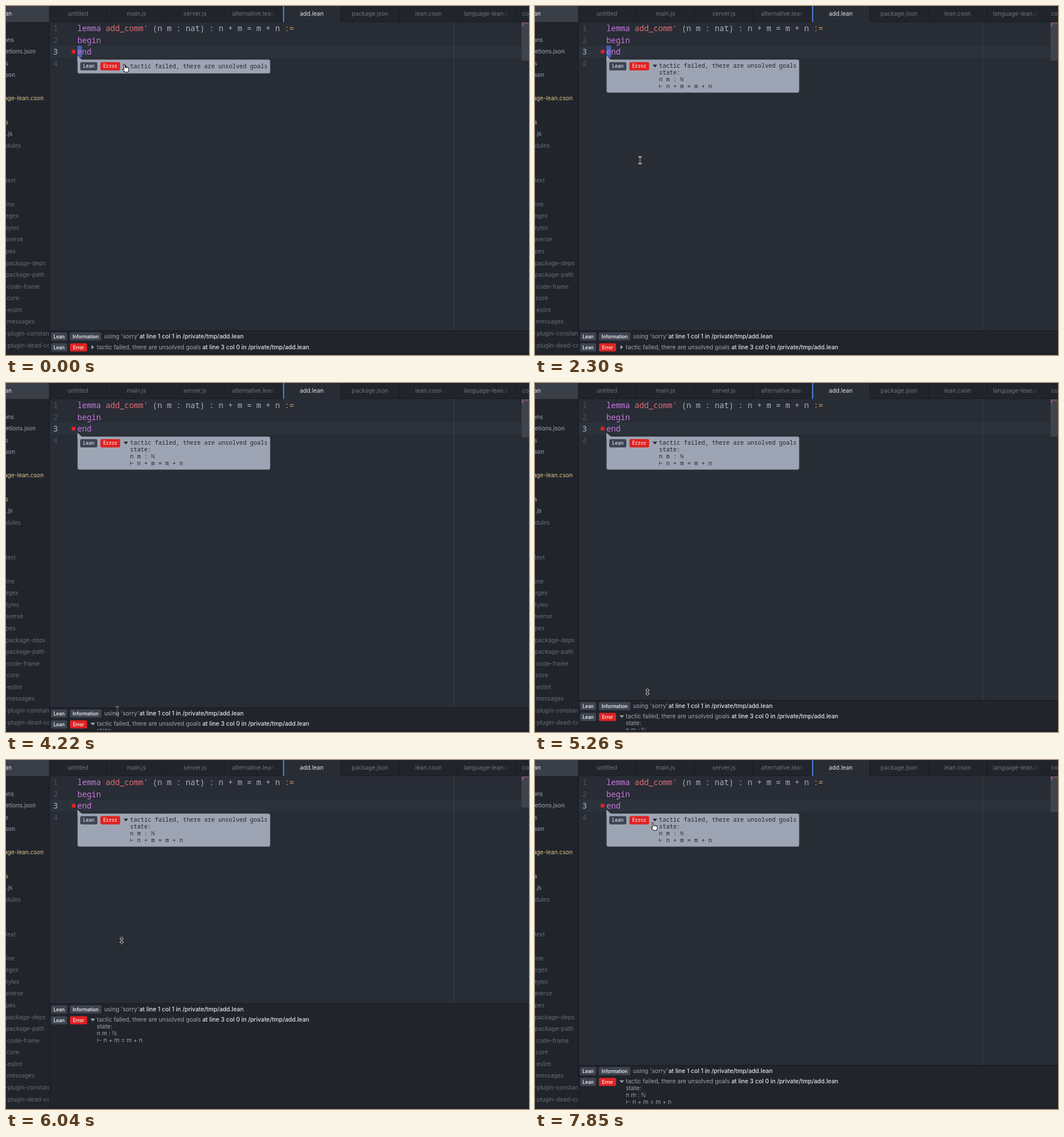
An HTML page that plays this animation: 916x611 px, repeating every 8000 ms.

```html
<!DOCTYPE html>
<html lang="en">
<head>
<meta charset="utf-8">
<title>Editor error messages</title>
<style>
  html, body { margin: 0; width: 100%; height: 100%; overflow: hidden; background: #282c34; }
  svg { display: block; width: 100%; height: 100%; }
  text { font: 10.2px Inter, "DejaVu Sans", sans-serif; fill: #9da5b4; white-space: pre; }
  .msg { font-size: 10.3px; }
  .place { font-size: 10.3px; font-weight: 500; fill: #e3e6eb; }
  .code { font: 500 13.75px "Noto Sans Mono", "DejaVu Sans Mono", monospace; fill: #abb2bf; }
  .tip { font: 10.3px "Noto Sans Mono", "DejaVu Sans Mono", monospace; fill: #21252b; }
  .badge { font-size: 8.3px; font-weight: 500; fill: #fff; text-anchor: middle; }
  .monoBadge { font: 500 8.3px "Noto Sans Mono", "DejaVu Sans Mono", monospace; fill: #fff; text-anchor: middle; }
  .mid { text-anchor: middle; }
  .end { text-anchor: end; }
  .tab { fill: #6d7480; }
  .ignored { fill: #666d79; }
  .modified { fill: #e2c08d; }
  .white { fill: #e3e6eb; }
  .key { fill: #c678dd; }
  .name { fill: #e06c75; }
  .op { fill: #d19a66; }
  .lineNo { fill: #495162; font-weight: 400; }
</style>
</head>
<body>
<svg id="stage" viewBox="0 0 916 611" preserveAspectRatio="none"></svg>
<script>
const BORDER = '#181a1f', SIDE = '#21252b', RED = '#e02222', GREY = '#3e4451';

const rect = (x, y, w, h, fill, extra = '') =>
  `<rect x="${x}" y="${y}" width="${w}" height="${h}" fill="${fill}" ${extra}/>`;
const text = (x, y, str, cls = '') => `<text x="${x}" y="${y}" class="${cls}">${str}</text>`;
const badge = (x, y, w, label, fill, cls = 'badge') =>
  rect(x, y, w, 14.4, fill, 'rx="2.5"') + text(x + w / 2, y + 10.1, label, cls);
const lines = (x, y, rows, cls) => rows.map((s, i) => text(x, y + i * 12, s, cls)).join('');
const arrowRight = (x, y, fill) => `<path d="M${x - 2} ${y - 3.7}l4.5 3.7l-4.5 3.7z" fill="${fill}"/>`;
const arrowDown = (x, y, fill) => `<path d="M${x - 4} ${y - 2.2}h8l-4 4.6z" fill="${fill}"/>`;

const TITLE = 'tactic failed, there are unsolved goals';
const GOALS = [TITLE, 'state:', 'n m : ℕ', '⊢ n + m = m + n'];

function sidebar() {
  // [row, right edge, label, class]
  const files = [
    [0, 14, 'ons'], [1, 52, 'etions.json'], [2, 4, 's'], [3, 16, 'son'],
    [5, 66, 'age-lean.cson', 'modified'], [7, 4, 's', 'modified'], [8, 11.5, '.js'],
    [9, 26, 'dules', 'ignored'], [12, 17, 'text', 'ignored'], [14, 15, 'ine', 'ignored'],
    [15, 22, 'egex', 'ignored'], [16, 23, 'tyles', 'ignored'], [17, 30, 'averse', 'ignored'],
    [18, 17, 'pes', 'ignored'], [19, 69.5, '-package-deps', 'ignored'],
    [20, 67.5, '-package-path', 'ignored'], [21, 59, '-code-frame', 'ignored'],
    [22, 23, '-core', 'ignored'], [23, 28, '-eslint', 'ignored'], [24, 50.5, '-messages', 'ignored'],
    [25, 75.5, '-plugin-constan', 'ignored'], [26, 78, '-plugin-dead-co', 'ignored']
  ];
  return rect(0, 0, 76, 611, SIDE) + rect(0, 0, 76, 28, '#3a3f47') +
    text(10, 16.5, 'an', 'end white') +
    files.map(([row, x, s, cls = '']) => text(x, 62.5 + row * 20.58, s, 'end ' + cls)).join('') +
    rect(75.5, 0, 1.2, 611, BORDER);
}

function tabs() {
  const centred = [[126, 'untitled'], [228.5, 'main.js'], [331, 'server.js'],
    [637.5, 'package.json'], [740, 'lean.cson']];
  const fade = (x, w) => rect(x, 4, w, 18, 'url(#fade)') + rect(x + w, 4, 9, 18, SIDE);
  return rect(76.7, 0, 840, 28, SIDE) + rect(76.7, 27, 840, 1, BORDER) +
    rect(486, 0, 100.5, 28, '#282c34') +
    centred.map(([x, s]) => text(x, 16.5, s, 'mid tab')).join('') +
    text(396, 16.5, 'alternative.lean', 'tab') + fade(460, 12) +
    text(802, 16.5, 'language-lean.cs', 'tab') + fade(870, 12) +
    text(904, 16.5, 'co', 'tab') + text(535.5, 16.5, 'add.lean', 'mid white') +
    [176, 279, 381.5, 586, 688.5, 791, 894].map(x => rect(x, 0, 1, 28, BORDER)).join('') +
    rect(485.3, 0, 1.8, 28, '#568af2');
}

function editor() {
  const baseline = n => 23.5 + n * 20.6;
  const code = [
    `<tspan class="key">lemma</tspan> <tspan class="name">add_comm'</tspan> (n m : nat) : n + m = m + n <tspan class="op">:=</tspan>`,
    '<tspan class="key">begin</tspan>', '<tspan class="key">end</tspan>'
  ];
  return rect(76.7, 69.5, 826.3, 20.6, '#2c323c') +
    rect(784, 28, 1, 583, '#3b4048') +
    rect(125, 69.5, 8.3, 20.6, '#4560b0', 'id="caret"') +
    [1, 2, 3, 4].map(n => text(87, baseline(n), n, 'mid code ' + (n === 3 ? '' : 'lineNo'))).join('') +
    code.map((s, i) => text(125, baseline(i + 1), s, 'code')).join('') +
    `<circle cx="118.4" cy="79.8" r="3.6" fill="${RED}"/>` +
    rect(903, 28, 13, 68, '#404349', 'id="thumb"') +
    rect(903, 29.5, 4, 1.2, '#9a62ad') + rect(908, 29.5, 7, 1.2, '#a85862') +
    rect(903, 31.7, 4, 1.2, '#9a62ad') + rect(903, 33.9, 3, 1.2, '#9a62ad');
}

function tooltip() {
  return rect(125.4, 93.9, 337.2, 24, '#9da5b4', 'id="tip" rx="3" stroke="#6f7684" stroke-width=".8"') +
    '<path d="M125 87v10h8v-3z" fill="#9da5b4"/>' +
    badge(130, 98.3, 30, 'Lean', GREY, 'monoBadge') +
    badge(165.3, 98.3, 34.6, 'Error', RED, 'monoBadge') +
    `<g id="tipClosed">${arrowRight(209, 105.5, SIDE)}${text(217.3, 109, TITLE, 'tip')}</g>` +
    `<g id="tipOpen">${arrowDown(210, 105, SIDE)}${lines(217.3, 108, GOALS, 'tip')}</g>`;
}

function panel() {
  return `<g id="panel">${rect(76.7, 0, 840, 611, SIDE)}${rect(76.7, 0, 840, 1.2, BORDER)}` +
    badge(79, 3.4, 28, 'Lean', GREY) + badge(112, 3.4, 55, 'Information', GREY) +
    text(172, 14, "using 'sorry'", 'msg') +
    text(233.7, 14, 'at line 1 col 1 in /private/tmp/add.lean', 'place') +
    badge(79, 22.4, 28, 'Lean', GREY) + badge(112, 22.4, 30, 'Error', RED) +
    `<g id="msgClosed">${arrowRight(151.7, 29.3, '#9da5b4')}${text(159, 33, TITLE, 'msg')}</g>` +
    `<g id="msgOpen">${arrowDown(152, 29, '#9da5b4')}${lines(159, 32.2, GOALS, 'msg')}</g>` +
    `<g id="place">${text(344, 33, 'at line 3 col 0 in /private/tmp/add.lean', 'place')}</g></g>` +
    rect(76.7, 607.5, 840, 1.3, BORDER) + rect(76.7, 608.8, 840, 3, SIDE);
}

function pointers() {
  const beam = 'M-3 -6.2q3 0 3 2.2v8q0 2.2 -3 2.2M3 -6.2q-3 0 -3 2.2v8q0 2.2 3 2.2M-1.5 2h3';
  return `<g id="pointer">
    <g id="beam" fill="none"><path d="${beam}" stroke="#fff" stroke-width="2.2"/><path d="${beam}" stroke="#111" stroke-width=".8"/></g>
    <path id="size" d="M0 -6.4l3.3 3.6h-2.1v5.6h2.1l-3.3 3.6l-3.3 -3.6h2.1v-5.6h-2.1z" fill="#111" stroke="#fff" stroke-width=".8"/>
    <g id="hand" stroke="#111" stroke-width="1" stroke-linejoin="round" transform="rotate(-10)">
      <path d="M-2.6 2v-7.4a1.2 1.2 0 0 1 2.4 0v3.8l4.2 1q1.5.4 1.5 2v2.2l-1.3 3.9h-5.2l-3.8 -4.7q-.8 -1.7 .8 -1.6z" fill="#fff"/>
      <path d="M-.2 -1.6v2.2M1.8 -1v1.8M3.7 -.5v1.6" fill="none" stroke-width=".7"/></g>
    <path id="arrow" d="M-3 -6v11.5l2.7 -2.5l1.8 4l2 -.9l-1.8 -3.9h3.6z" fill="#111" stroke="#fff"/>
  </g>`;
}

const stage = document.getElementById('stage');
stage.innerHTML = `<defs><linearGradient id="fade"><stop stop-color="${SIDE}" stop-opacity="0"/>
  <stop offset="1" stop-color="${SIDE}"/></linearGradient></defs>` +
  rect(0, 0, 916, 611, '#282c34') + editor() + sidebar() + tabs() + tooltip() + panel() + pointers();

const $ = id => document.getElementById(id);
const show = (id, on) => $(id).setAttribute('display', on ? 'inline' : 'none');

// [start ms, pointer, x, y, panel top, panel top the minimap still reflects]
const STEPS = [
  [0, 'hand', 209, 108.5, 568],
  [2300, 'beam', 184, 270, 568], [2450, 'beam', 170, 405, 568], [2600, 'beam', 157, 520, 568],
  [2740, 'arrow', 147, 588, 568], [2890, 'arrow', 145, 602, 568], [3030, 'hand', 150, 601, 568],
  [3180, 'hand', 152, 600, 568],
  [3630, 'hand', 154, 599, 568], [3780, 'beam', 164, 594, 568], [3930, 'beam', 179, 586, 568],
  [4070, 'beam', 190, 579, 568], [4220, 'beam', 195, 573, 568], [4370, 'beam', 197, 572, 568],
  [4520, 'size', 198, 572, 568], [4820, 'size', 198, 573, 568],
  [5110, 'size', 198, 560, 566], [5260, 'size', 197, 541, 555], [5410, 'size', 197, 514, 538],
  [5560, 'size', 196.5, 487, 517.3],
  [5830, 'size', 200, 400, 468], [6040, 'size', 202.5, 316, 426, 468],
  [6330, 'size', 202, 330, 316], [6480, 'size', 199, 440, 420], [6620, 'size', 195, 527, 505],
  [6830, 'size', 190, 530, 534], [7040, 'beam', 177, 175, 534], [7190, 'beam', 185, 141, 534],
  [7400, 'beam', 192, 132, 534], [7550, 'arrow', 200, 124, 534], [7700, 'hand', 206, 117, 534],
  [7850, 'hand', 208.2, 116, 534]
];

function draw(t) {
  const [, kind, x, y, top, mapTop = top] = STEPS.findLast(s => s[0] <= t);
  const tipOpen = t >= 290, msgOpen = t >= 3480;
  show('tipOpen', tipOpen);
  show('tipClosed', !tipOpen);
  $('tip').setAttribute('height', tipOpen ? 57.7 : 24);
  show('msgOpen', msgOpen);
  show('msgClosed', !msgOpen);
  $('place').setAttribute('transform', `translate(0 ${msgOpen ? -0.8 : 0})`);
  show('caret', !msgOpen);
  $('panel').setAttribute('transform', `translate(0 ${top})`);
  $('thumb').setAttribute('height', (mapTop - 28) / 8);
  $('pointer').setAttribute('transform', `translate(${x} ${y})`);
  $('beam').setAttribute('opacity', t >= 4220 && t < 4370 ? 0.5 : 1);
  for (const id of ['beam', 'size', 'hand', 'arrow']) show(id, id === kind);
}

const start = performance.now();
function tick() {
  draw((performance.now() - start) % 8000);
  requestAnimationFrame(tick);
}
tick();
</script>
</body>
</html>
```
